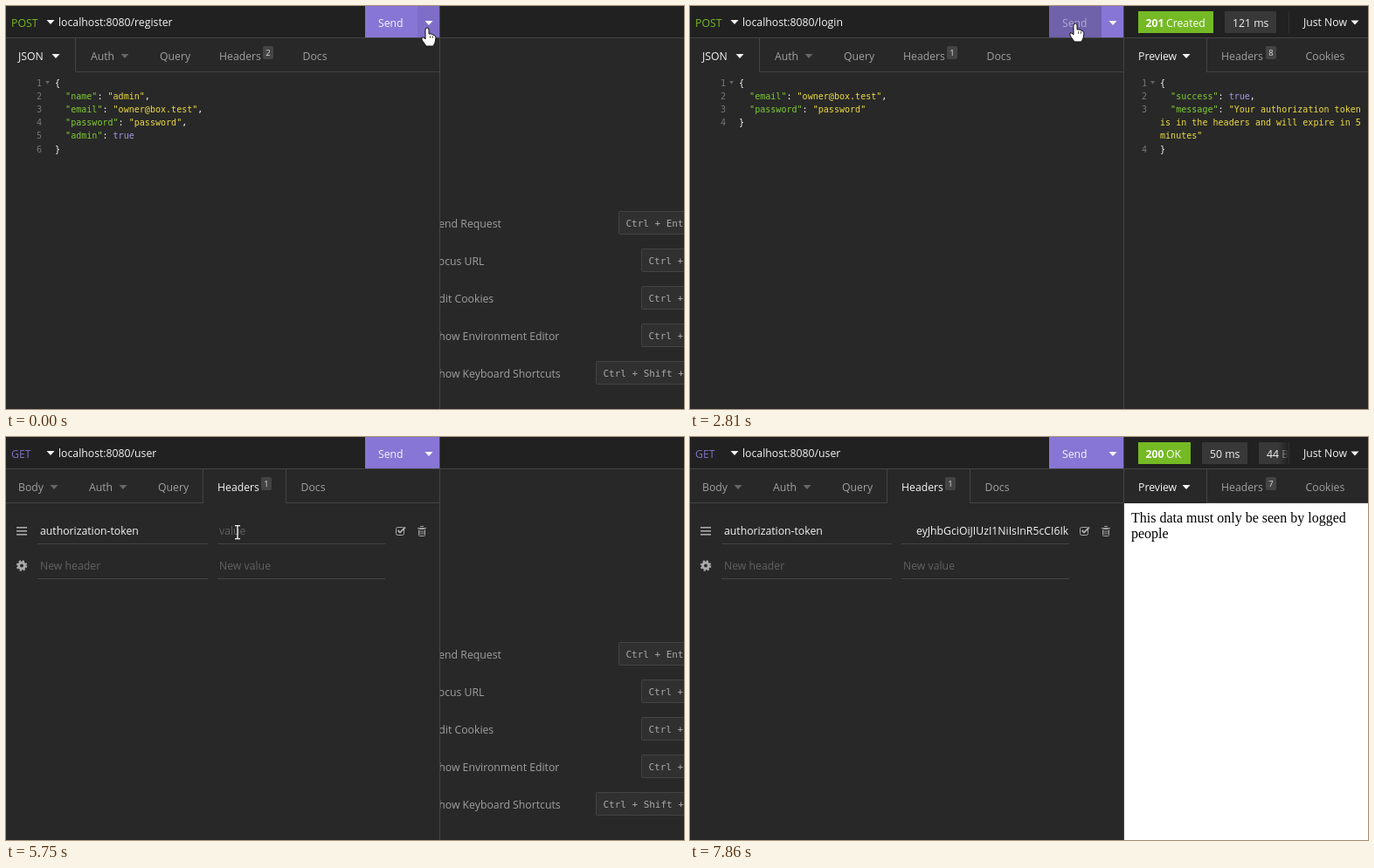
Animation, 776 px wide and 462 px high, one loop 8000 ms. Source, as an HTML page with a canvas:

```html
<!DOCTYPE html>
<html lang="en">
<head>
<meta charset="utf-8">
<title>API client session</title>
<style>
html, body { margin: 0; width: 776px; height: 462px; overflow: hidden; background: #282828; }
canvas { display: block; }
</style>
</head>
<body>
<canvas id="stage" width="776" height="462"></canvas>
<script>
const ctx = document.getElementById('stage').getContext('2d');
const DURATION = 8000;
const SANS = '"Open Sans", "Noto Sans", sans-serif';
const UI = '12.25px ' + SANS;
const MONO = '"DejaVu Sans Mono", monospace';
const BG = '#282828', BAR = '#212121', LINE = '#444', WHITE = '#f4f4f4', GREY = '#a0a0a0', DIM = '#626262';
const GREEN = '#75ba24', PURPLE = '#8776d5', PRESSED = '#7768b8', HOVER = '#6f61aa';

// Scene changes, in ms
const LOGIN = 1320, HEADERS_LEFT = 3350, HEADERS_RIGHT = 3650, DRAG = 4050, USER = 5390, PASTE = 6020;
const LOADS = [[420, 690], [2560, 2800], [6770, 7050]];

const TOKEN = ['eyJhbGciOiJIUzI1NiI', 'sInR5cCI6IkpXVCJ9.', 'eyJlbWFpbCI6Im93b', 'mVyQGJveC50ZXN0',
  'IiwiYWRtaW4iOnRy', 'dWUsImlhdCI6MTY', '2OTM0MzQ2NiwiZX', 'hwIjoxNjY5MzQ0M',
  'DY2fQ.7ea-S2EQPB', 'wm_7wcVG8a99aJbx', 'EuFKzIi2cv_NNj6fg'];
const REGISTER_BODY = `{
  "name": "admin",
  "email": "owner@box.test",
  "password": "password",
  "admin": true
}`;
const LOGIN_BODY = `{
  "email": "owner@box.test",
  "password": "password"
}`;
const REGISTER_REPLY = `{
  "success": true
}`;
const LOGIN_REPLY = `{
  "success": true,
  "message": "Your authorization token
is in the headers and will expire in 5
minutes"
}`;

// Pointer stops: time, x, y
const PATH = [
  [0, 482, 25], [30, 482, 25], [180, 441, 24], [880, 441, 24], [930, 428, 62], [1300, 30, 170],
  [1590, 180, 180], [1750, 180, 180], [2360, 441, 20], [2940, 441, 20], [3320, 632, 55], [3650, 632, 55],
  [4040, 753, 333], [4160, 738, 317], [4500, 755, 245], [4920, 640, 163], [4970, 640, 163], [5210, 55, 255],
  [5389, 55, 255], [5390, 92, 175], [5570, 92, 175], [5750, 265, 109], [6050, 265, 109], [6600, 432, 18],
  [7100, 432, 18], [7590, 548, 110], [7860, -20, 130], [8000, -20, 130]];

function pointerAt(t) {
  const i = PATH.findIndex(p => p[0] > t);
  const [t0, x0, y0] = PATH[i - 1], [t1, x1, y1] = PATH[i];
  const u = (t - t0) / (t1 - t0), k = u * u * (3 - 2 * u);
  return { x: x0 + (x1 - x0) * k, y: y0 + (y1 - y0) * k };
}

function box(x, y, w, h, color) {
  ctx.fillStyle = color;
  ctx.fillRect(x, y, w, h);
}
function text(s, x, y, color = WHITE, font = UI) {
  ctx.font = font;
  ctx.fillStyle = color;
  ctx.fillText(s, x, y);
}
function shape(points, fill, stroke) {
  ctx.beginPath();
  points.forEach(([x, y]) => ctx.lineTo(x, y));
  ctx.closePath();
  ctx.fillStyle = fill;
  ctx.fill();
  if (stroke) { ctx.strokeStyle = stroke; ctx.lineWidth = 1; ctx.stroke(); }
}
function roundBox(x, y, w, h, r, fill, stroke) {
  ctx.beginPath();
  ctx.roundRect(x, y, w, h, r);
  if (fill) { ctx.fillStyle = fill; ctx.fill(); }
  if (stroke) { ctx.strokeStyle = stroke; ctx.lineWidth = 1; ctx.stroke(); }
}
function clipped(x, y, w, h, draw) {
  ctx.save();
  ctx.beginPath();
  ctx.rect(x, y, w, h);
  ctx.clip();
  draw();
  ctx.restore();
}
const caret = (x, y, color = WHITE) => shape([[x - 4.5, y - 2.5], [x + 4.5, y - 2.5], [x, y + 2.5]], color);

function count(n, x) {
  roundBox(x, 46, 12, 15, 2, LINE);
  text(n, x + 3.2, 57, '#ddd', '9.5px ' + SANS);
}

// Bottom rule with a gap under the active tab
function tabRule(left, right, from, to) {
  box(left, 75, from - left, 1, LINE);
  box(to, 75, right - to, 1, LINE);
  if (from > left) box(from, 37, 1, 39, LINE);
  box(to, 37, 1, 39, LINE);
}

function code(source, x, numbers) {
  const CHAR = 6.05, PITCH = 15.2, font = '10.05px ' + MONO;
  let col = 0, row = 0;
  for (const match of source.matchAll(/"[^"]*"|\w+|[^"\w]+/g)) {
    const part = match[0];
    const isKey = source[match.index + part.length] === ':';
    const color = part[0] === '"' ? (isKey ? '#80cc34' : '#eddc40') : /^\w/.test(part) ? '#a598ea' : WHITE;
    part.split('\n').forEach((piece, i) => {
      if (i) { row++; col = 0; }
      text(piece, x + col * CHAR, 91.5 + row * PITCH, color, font);
      col += piece.length;
    });
  }
  [...numbers].forEach((n, i) => text(n, x - 21, 91.5 + i * PITCH, '#777', font));
  shape([[x - 11, 86], [x - 6, 86], [x - 8.5, 89.5]], '#666');
}

function headerRow(y, name, value, color) {
  text(name, 39, y + 4, color);
  text(value, 244, y + 4, color);
  box(36, y + 14, 195, 1, LINE);
  box(242, y + 14, 192, 1, LINE);
}

function headerEditor(t) {
  if (t < USER) headerRow(108, 'Content-Type', 'application/json', WHITE);
  else headerRow(108, 'authorization-token', '', WHITE);
  if (t >= USER && t < PASTE) text('value', 244, 112, DIM);
  if (t >= PASTE) clipped(243, 95, 191, 26, () => {
    const token = TOKEN.join('');
    ctx.font = UI;
    text(token, t < 7700 ? 424 - ctx.measureText(token).width : 259, 112);
  });
  headerRow(148, 'New header', 'New value', DIM);

  for (const y of [104, 108, 112]) box(12, y - 1, 12, 1.6, '#aaa');
  // Gear
  ctx.strokeStyle = '#aaa';
  ctx.lineWidth = 3;
  ctx.beginPath();
  ctx.arc(18, 147.5, 3.4, 0, 7);
  ctx.stroke();
  ctx.lineWidth = 2;
  ctx.setLineDash([2.1, 2.1]);
  ctx.beginPath();
  ctx.arc(18, 147.5, 5.3, 0, 7);
  ctx.stroke();
  ctx.setLineDash([]);
  // Checkbox
  roundBox(446.5, 103.5, 9, 9, 2, null, '#aaa');
  ctx.lineWidth = 1.8;
  ctx.beginPath();
  ctx.moveTo(448.5, 107);
  ctx.lineTo(451, 109.5);
  ctx.lineTo(457, 103.5);
  ctx.stroke();
  // Bin
  roundBox(472.5, 105.5, 7, 8, 1, null, GREY);
  box(471, 104, 10, 1, GREY);
  box(474, 102, 4, 1, GREY);
  for (const x of [474, 476, 478]) box(x - .4, 107, .8, 5, GREY);
}

function requestPane(t, pointer) {
  box(0, 0, 496, 36, BAR);
  const get = t >= USER, login = t >= LOGIN && !get, shift = get ? -2 : 0;
  const url = 'localhost:8080/' + (get ? 'user' : login ? 'login' : 'register');
  text(get ? 'GET' : 'POST', 6, 24, get ? '#7d72c4' : GREEN);
  caret(51, 18.5);
  text(url, 60, 23);
  const focused = (t > 400 && t < 1100) || (t > 6740 && t < 7300);
  if (focused) box(Math.floor(60 + ctx.measureText(url).width), 10, 1, 17, WHITE);

  const over = pointer.y < 36 && pointer.x > 411 && pointer.x < 496;
  const onSend = over && pointer.x < 471;
  box(411, 0, 60, 36, onSend ? HOVER : t >= 880 && t < 960 ? PRESSED : PURPLE);
  box(471, 0, 25, 36, over && !onSend ? '#7e6ec8' : PURPLE);
  text('Send', 426, 24, onSend ? '#b3aad0' : '#f8f6fd');
  caret(484, 19.5, '#f8f6fd');
  box(0, 36, 496, 1, LINE);

  const headers = t >= HEADERS_LEFT;
  text(get ? 'Body' : 'JSON', 14, 62, headers ? GREY : WHITE);
  caret(57 + shift, 57.5, headers ? '#666' : WHITE);
  text('Auth', 97 + shift, 62, GREY);
  caret(136 + shift, 57.5, '#666');
  text('Query', 176 + shift, 62, GREY);
  text('Headers', 244 + shift, 62, headers ? WHITE : GREY);
  text('Docs', 339.5 + shift, 62, GREY);
  count(t < LOGIN ? '2' : '1', 294 + shift);
  if (headers) {
    tabRule(0, 496, 227 + shift, 322 + shift);
    headerEditor(t);
  } else {
    tabRule(0, 496, 0, 79);
    code(login ? LOGIN_BODY : REGISTER_BODY, 56, login ? '1234' : '123456');
  }
}

function shortcuts() {
  const rows = [['Send Request', 'Ctrl + Enter', 701], ['Focus URL', 'Ctrl + L', 727], ['Edit Cookies', 'Ctrl + K', 727],
    ['Show Environment Editor', 'Ctrl + E', 727], ['Show Keyboard Shortcuts', 'Ctrl + Shift + ?', 675]];
  rows.forEach(([label, keys, x], i) => {
    const y = 249 + i * 43;
    text(label, 488.5, y + 5, GREY);
    roundBox(x + .5, y - 13.5, 120, 26, 1, '#303030', LINE);
    text(keys, x + 8.5, y + 4, '#aaa', '10.96px ' + MONO);
  });
}

function loading(t) {
  box(497, 0, 279, 462, 'rgba(33,33,33,.84)');
  text('Loading...', 597, 256, WHITE, '19.5px ' + SANS);
  ctx.save();
  ctx.translate(641, 310.5);
  ctx.rotate((t - 6830) * .0031);
  for (let i = 0; i < 2; i++) {
    ctx.strokeStyle = '#ddd';
    ctx.lineWidth = 8;
    ctx.beginPath();
    ctx.arc(0, 0, 18.5, -2.7, -.2);
    ctx.stroke();
    shape([[9, -3], [30, 1], [18, 13]], '#ddd');
    ctx.rotate(Math.PI);
  }
  ctx.restore();
  roundBox(581.5, 367.5, 120, 31, 3, '#222', '#aaa');
  text('Cancel Request', 597, 389);
}

function responseBar(status, label, badge, time, size, age, divider) {
  box(513, 6, badge, 25, GREEN);
  text(status, 521.5, 24, '#fff', 'bold ' + UI);
  text(label, 545, 24, '#fff');
  const x = 513 + badge + 13, w = time.length > 5 ? 59 : 52;
  box(x, 6, w, 25, '#383838');
  text(time, x + 9, 24);
  if (size) {
    box(x + w + 13, 6, 50, 25, '#383838');
    text(size, x + w + 22, 24);
  }
  const fade = ctx.createLinearGradient(divider - 12, 0, divider, 0);
  fade.addColorStop(0, 'rgba(33,33,33,0)');
  fade.addColorStop(1, BAR);
  box(divider - 12, 0, 12, 36, fade);
  box(divider, 0, 776 - divider, 36, BAR);
  box(divider, 6, 1, 25, '#333');
  ctx.font = UI;
  text(age, 752 - ctx.measureText(age).width, 23);
  caret(761, 19);
}

function selection(t, pointer) {
  if (t < DRAG) return;
  const p = t < 4930 ? pointer : { x: 640, y: 163 };
  const first = Math.max(0, Math.min(10, Math.floor((p.y - 154) / 17)));
  for (let i = first; i < 11; i++) {
    const from = i === first ? Math.max(646, p.x - 13) : 646;
    const to = i === 10 ? 753 : 766;
    if (to > from) box(from, 155 + i * 17, to - from, 17, '#505050');
  }
}

function headerTable(t, pointer) {
  text('NAME', 521, 110, GREY, '9.3px ' + SANS);
  text('VALUE', 649, 110, GREY, '9.3px ' + SANS);
  for (const [y, h] of [[121, 27], [346, 44], [419, 43]]) box(513, y, 256, h, '#313131');
  selection(t, pointer);
  const rows = [[140, 'X-Powered-By', ['Tarnelo']], [168, 'authorization-token', TOKEN],
    [365, 'Content-Type', ['application/json; ch', 'arset=utf-8']], [409, 'Content-Length', ['100']],
    [437, 'ETag', ['W/"64-zZrKFQRbuy', 'Ke52cLGG6p+jeJ/1I"']]];
  for (const [y, name, lines] of rows) {
    text(name, 518, y);
    lines.forEach((line, i) => text(line, 646, y + i * 17));
  }
}

function responsePane(t, pointer) {
  box(497, 0, 279, 36, BAR);
  box(497, 36, 279, 1, LINE);
  const busy = LOADS.some(([a, b]) => t >= a && t < b);
  const register = t >= LOADS[0][1] && t < LOGIN;
  const login = t >= LOADS[1][1] && t < USER;
  const user = t >= LOADS[2][1];
  if (!register && !login && !user) {
    shortcuts();
    if (busy) loading(t);
    return;
  }
  const old = t >= HEADERS_LEFT && login, headers = login && t >= HEADERS_RIGHT;
  if (user) responseBar('200', 'OK', 60, '50 ms', '44 B', 'Just Now', 685);
  else responseBar('201', 'Created', 86, register ? '181 ms' : '121 ms', '', old ? '1 Minute Ago' : 'Just Now', old ? 662 : 685);
  text('Preview', 513, 62, headers ? GREY : WHITE);
  caret(568, 57.5, headers ? '#666' : WHITE);
  text('Headers', 608, 62, headers ? WHITE : GREY);
  count(login ? '8' : '7', 659);
  text('Cookies', 704.5, 62, GREY);
  if (headers) tabRule(497, 776, 592, 687);
  else tabRule(497, 776, 497, 591);

  if (headers) headerTable(t, pointer);
  else if (login) code(LOGIN_REPLY, 538, '123  4');
  else if (register) code(REGISTER_REPLY, 538, '123');
  else {
    box(497, 76, 279, 386, '#fff');
    const serif = '16px "Liberation Serif", serif';
    text('This data must only be seen by logged', 505, 98, '#000', serif);
    text('people', 505, 116, '#000', serif);
  }
}

function drawPointer(t, { x, y }) {
  const dragging = t >= DRAG && t < 4950;
  const beam = dragging || (t >= USER && x > 242 && x < 434 && y > 95 && y < 122);
  ctx.save();
  ctx.translate(x, y);
  if (dragging) {
    ctx.fillStyle = 'rgba(196,184,28,.8)';
    ctx.beginPath();
    ctx.arc(0, 0, 11.5, 0, 7);
    ctx.fill();
  }
  if (beam) {
    const color = dragging ? '#77702a' : '#eee';
    box(-.7, -7, 1.4, 14, color);
    box(-3, -8, 6, 1.3, color);
    box(-3, 7, 6, 1.3, color);
  } else if ((y < 37 && x > 411 && x < 496) || (y > 37 && y < 75 && x > 592 && x < 687)) {
    shape([[-1, 0], [1, 0], [2, 2], [2, 7], [5, 7], [9, 9], [10, 11], [9, 17], [7, 21], [-1, 21],
      [-6, 14], [-6, 11], [-4, 11], [-2, 13], [-2, 2]], '#fff', '#111');
    for (const dx of [3, 6]) box(dx, 9, .8, 3, '#444');
  } else {
    shape([[0, 0], [0, 16], [4, 12.5], [6.5, 18], [9, 17], [6.5, 11.5], [11.5, 11.5]], '#fff', '#111');
  }
  ctx.restore();
}

function frame(now) {
  const t = now % DURATION, pointer = pointerAt(t);
  box(0, 0, 776, 462, BG);
  clipped(497, 0, 279, 462, () => responsePane(t, pointer));
  requestPane(t, pointer);
  box(496, 0, 1, 462, LINE);
  drawPointer(t, pointer);
  requestAnimationFrame(frame);
}
requestAnimationFrame(frame);
</script>
</body>
</html>
```
